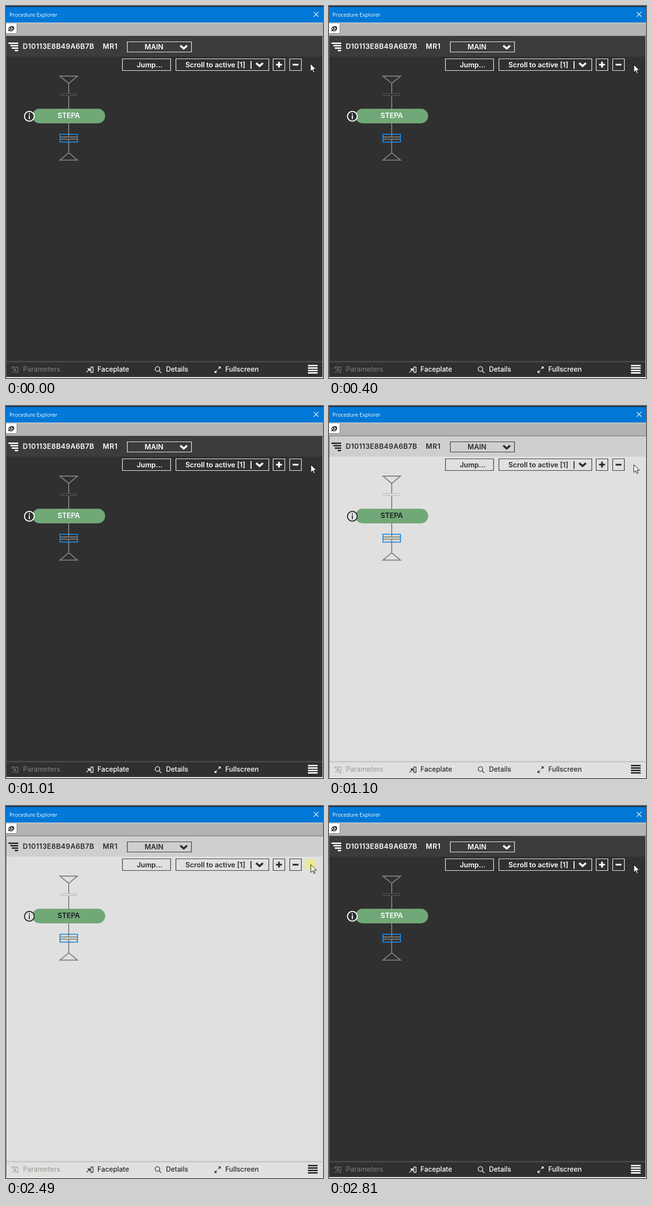
These frames come from a looping animation (652x764 px, 3590 ms). An HTML page:

```html
<!DOCTYPE html>
<html lang="en">
<head>
<meta charset="utf-8">
<title>Procedure Explorer</title>
<style>
html, body { margin: 0; width: 100%; height: 100%; overflow: hidden; }
svg { display: block; color: var(--ink); }
svg { --ink: #fff; --page: #303030; --head: #3c3c3c; --rule: #484848; --off: #757575; --step: #fff; --bar: #808080; --pick: #1f86e4; }
svg.light { --ink: #2c2c2c; --page: #e0e0e0; --head: #cfcfcf; --rule: #c8c8c8; --off: #a3a39b; --step: #1c1c1c; --bar: #7d8a78; --pick: #2b8ad2; }
text { font: 500 14px Inter, "Open Sans", sans-serif; fill: currentColor; }
.bold text, text.bold { font-weight: 600; font-size: 14.4px; }
.line { fill: none; stroke: currentColor; }
.solid { fill: currentColor; }
.off { color: var(--off); }
</style>
</head>
<body>
<svg id="stage" width="652" height="764" viewBox="0 0 652 764">
  <defs>
    <path id="chevron" d="M-7-3.2L0 2.8L7-3.2" fill="none" stroke="currentColor" stroke-width="4"/>
  </defs>

  <!-- window frame -->
  <rect width="652" height="764" fill="#e3e3e3"/>
  <rect width="652" height="2" fill="#1c2b3a"/>
  <rect y="2" width="652" height="32" fill="#0078d7"/>
  <rect y="35" width="652" height="26" fill="#b3b3b3"/>
  <rect y="61" width="652" height="1" fill="#696969"/>
  <rect y="61" width="1" height="702" fill="#696969"/>
  <rect y="763" width="652" height="1" fill="#fff"/>
  <text x="7" y="21.5" style="font: 11px 'Open Sans', sans-serif; fill: #fff">Procedure Explorer</text>
  <path d="M633 12.2l9.8 9.8m0-9.8l-9.8 9.8" stroke="#fff" stroke-width="1.2"/>
  <rect y="36" width="22" height="20" fill="#fff"/>
  <path d="M22.5 36v20.500H0" fill="none" stroke="#777"/>
  <g fill="none" stroke="#000" stroke-width="1.4">
    <ellipse cx="10.500" cy="47" rx="4.800" ry="4.300"/>
    <ellipse cx="12.500" cy="45" rx="3.200" ry="2.800"/>
    <path d="M5 51.500l5.500-5"/>
  </g>

  <!-- page -->
  <rect x="1" y="62" width="650" height="700" fill="var(--page)"/>
  <rect x="1" y="62" width="650" height="42" fill="var(--head)"/>
  <rect x="1" y="729" width="650" height="3" fill="var(--rule)"/>

  <!-- header and toolbar -->
  <path class="solid" d="M5 75h20v3h-20zM9 80h16v3h-16zM12 85h13v3h-13zM18 90h7v3h-7z"/>
  <g class="bold">
    <text x="34.500" y="88" letter-spacing=".4">D10113E8B49A6B7B</text>
    <text x="199" y="88" letter-spacing=".7">MR1</text>
    <text x="285" y="89">MAIN</text>
    <text x="269" y="126">Jump...</text>
    <text x="369" y="126">Scroll to active [1]</text>
  </g>
  <path class="line" stroke-width="1.2" d="M249.500 73.500h132v21h-132zM239.500 108.500h99v24h-99zM349.500 108.500h191v24h-191zM549.500 108.500h24v24h-24zM583.500 108.500h24v24h-24z"/>
  <path class="solid" d="M503 113h2v16h-2z"/>
  <use href="#chevron" x="365.500" y="84.500"/>
  <use href="#chevron" x="521.500" y="120.500"/>
  <path class="line" stroke-width="3.500" d="M555.500 120.500h12m-6-6v12M589.500 120.500h12"/>

  <!-- procedure chart -->
  <g fill="none" stroke="#808080" stroke-width="2">
    <path d="M111 144h36l-18 15zM129 159v21M129 185v27M129 241v28M129 274v27M111 316.500h36l-18-15z"/>
    <path stroke="var(--rule)" d="M111 180h36m0 4h-36"/>
    <path stroke="var(--bar)" d="M111 269h36m0 4.500h-36"/>
    <rect x="111" y="263.500" width="36" height="16" stroke="var(--pick)"/>
  </g>
  <rect x="54" y="211" width="150" height="30" rx="15" fill="#70a878"/>
  <text class="bold" x="106" y="230" style="fill: var(--step)">STEPA</text>
  <circle cx="48" cy="226.500" r="10" fill="var(--page)" stroke="currentColor" stroke-width="2"/>
  <path class="solid" d="M47 220.500h2v2.500h-2zM47 224.500h2v8h-2z"/>

  <!-- footer -->
  <g class="off">
    <path class="line" stroke-width="1.300" d="M12.500 745v-3.500h12v11h-6M12.500 753l7-7m-4.500-.500h5v5"/>
    <text x="35" y="751">Parameters</text>
  </g>
  <path class="line" stroke-width="1.300" d="M165.500 752.500l6.500-6.500M174.500 741.500h4.500v11h-4.500z"/>
  <path class="solid" d="M167 744.500h6v6z"/>
  <text x="188" y="751">Faceplate</text>
  <path class="line" stroke-width="1.300" d="M315 749.500l4.500 4"/>
  <circle class="line" cx="311.500" cy="745.500" r="4.800" stroke-width="1.300"/>
  <text x="329" y="751">Details</text>
  <path class="line" stroke-width="1.300" d="M430 752.500l4-4M436.500 745.500l4-4"/>
  <path class="solid" d="M429 748.500v5h5zM436.500 740.500h5v5z"/>
  <text x="451" y="751">Fullscreen</text>
  <path class="solid" d="M621 737h20v3h-20zM621 742h20v3h-20zM621 747h20v3h-20zM621 752h20v3h-20z"/>

  <circle id="click" cx="626" cy="120" r="12" fill="#ff0"/>
  <path id="cursor" d="M.5.500v16l3.700-3.600l2.500 5.900l2.500-1.100l-2.500-5.700h5.300z" fill="#fff" stroke="#000"/>
</svg>
<script>
const stage = document.getElementById("stage");
const click = document.getElementById("click");
const cursor = document.getElementById("cursor");

// Each list holds [start time, value]; a value stays until the next start.
const moves = [[0, "625.5,118"], [90, "623,119"], [320, "624,120"], [400, "626.5,120"]];
const glow = [[0, 0], [710, .5], [780, .25], [860, 0], [2340, .5], [2490, .33], [2580, .16], [2660, 0]];
const at = (steps, t) => steps.findLast(([start]) => start <= t)[1];

function draw() {
  const t = performance.now() % 3590;
  stage.classList.toggle("light", t >= 1100 && t < 2810);
  cursor.setAttribute("transform", `translate(${at(moves, t)})`);
  click.setAttribute("opacity", at(glow, t));
  requestAnimationFrame(draw);
}
draw();
</script>
</body>
</html>
```
